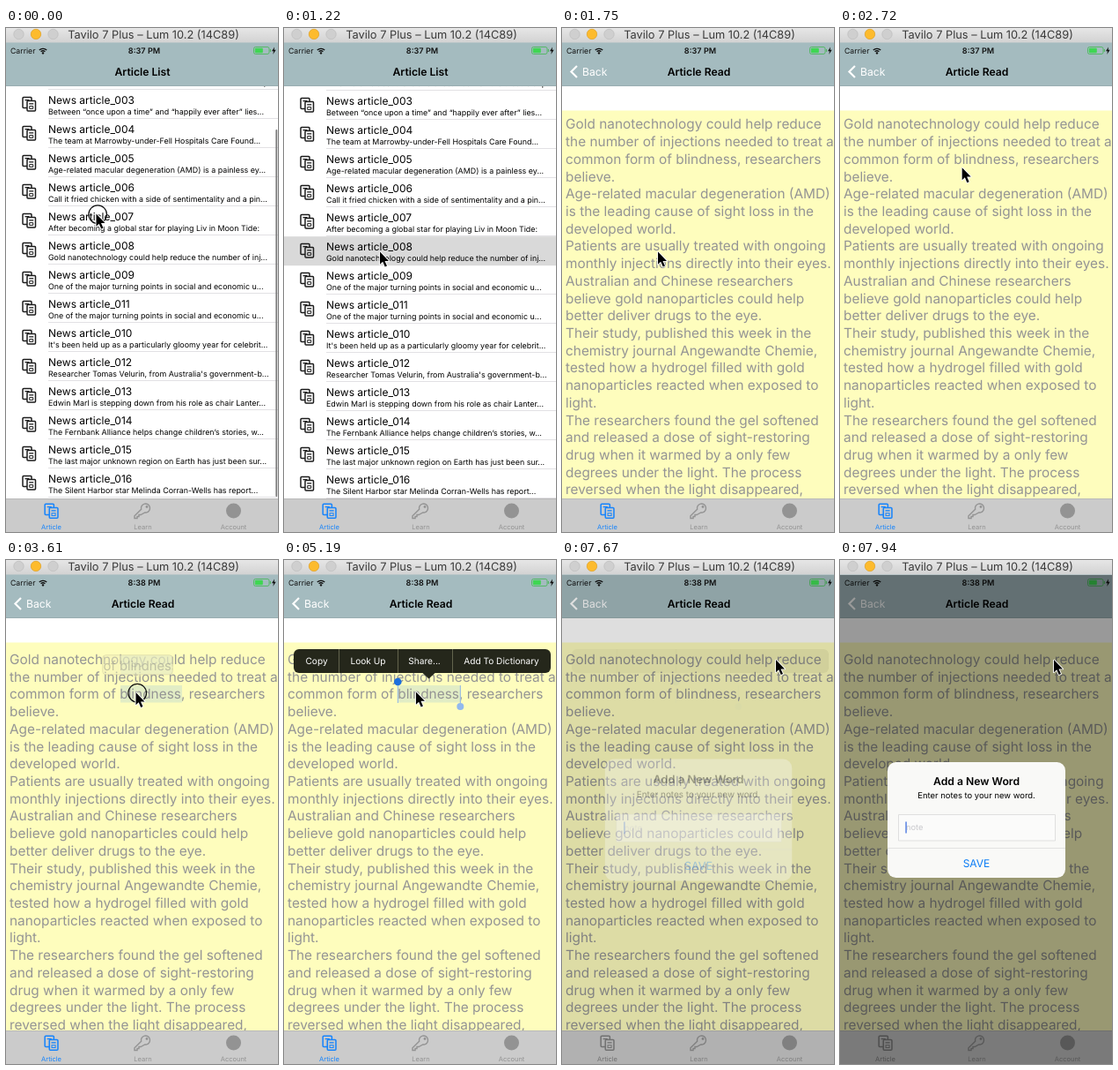
Write an HTML page with a canvas that moves like this. It is 309 px wide and 571 px high and loops after 8 s.

```html
<!DOCTYPE html>
<html lang="en">
<head>
<meta charset="utf-8">
<title>Article reader</title>
<style>
html, body { margin: 0; width: 100%; height: 100%; overflow: hidden; background: #fff; }
canvas { display: block; width: 309px; height: 571px; }
</style>
</head>
<body>
<canvas id="stage"></canvas>
<script>
const W = 309, H = 571, LOOP = 8000, TOP = 66, TAB = 533;
const canvas = document.getElementById('stage');
const ratio = window.devicePixelRatio || 1;
canvas.width = Math.round(W * ratio);
canvas.height = Math.round(H * ratio);
const c = canvas.getContext('2d');

const rows = [
  ['002', 'A new drama about love and a loss has won the theatre cup...'],
  ['003', 'Between “once upon a time” and “happily ever after” lies...'],
  ['004', 'The team at Marrowby-under-Fell Hospitals Care Found...'],
  ['005', 'Age-related macular degeneration (AMD) is a painless ey...'],
  ['006', 'Call it fried chicken with a side of sentimentality and a pin...'],
  ['007', 'After becoming a global star for playing Liv in Moon Tide:'],
  ['008', 'Gold nanotechnology could help reduce the number of inj...'],
  ['009', 'One of the major turning points in social and economic u...'],
  ['011', 'One of the major turning points in social and economic u...'],
  ['010', "It's been held up as a particularly gloomy year for celebrit..."],
  ['012', "Researcher Tomas Velurin, from Australia's government-b..."],
  ['013', 'Edwin Marl is stepping down from his role as chair Lanter...'],
  ['014', 'The Fernbank Alliance helps change children’s stories, w...'],
  ['015', 'The last major unknown region on Earth has just been sur...'],
  ['016', 'The Silent Harbor star Melinda Corran-Wells has report...']
];
const article = `Gold nanotechnology could help reduce
the number of injections needed to treat a
common form of blindness, researchers
believe.
Age-related macular degeneration (AMD)
is the leading cause of sight loss in the
developed world.
Patients are usually treated with ongoing
monthly injections directly into their eyes.
Australian and Chinese researchers
believe gold nanoparticles could help
better deliver drugs to the eye.
Their study, published this week in the
chemistry journal Angewandte Chemie,
tested how a hydrogel filled with gold
nanoparticles reacted when exposed to
light.
The researchers found the gel softened
and released a dose of sight-restoring
drug when it warmed by a only few
degrees under the light. The process
reversed when the light disappeared,`.split('\n');

// Pointer path: time, x, y
const path = [
  [0, 102.5, 210.5], [90, 102.5, 210.5], [610, 111, 275], [700, 111, 275], [870, 109, 253.5],
  [1920, 109, 253.5], [2100, 87, 206], [2200, 87, 206], [2810, 147.5, 150], [5100, 147.5, 150],
  [5190, 150, 149.5], [5280, 144, 146], [5550, 144, 146], [5900, 131, 132], [6250, 155, 113],
  [6350, 155, 113], [6780, 243, 113], [LOOP, 243, 113]
];
const presses = [[0, 180], [1050, 1200], [2980, 4040], [7230, 7310]];

const ramp = (t, a, b) => Math.min(1, Math.max(0, (t - a) / (b - a)));
const easeOut = p => 1 - (1 - p) ** 3;
const mix = (a, b, p) => a + (b - a) * p;
const within = (t, a, b) => t >= a && t < b;

function rect(x, y, w, h, fill) { c.fillStyle = fill; c.fillRect(x, y, w, h); }

function round(x, y, w, h, r, fill, stroke, line = 1) {
  c.beginPath();
  c.roundRect(x, y, w, h, r);
  if (fill) { c.fillStyle = fill; c.fill(); }
  if (stroke) { c.strokeStyle = stroke; c.lineWidth = line; c.stroke(); }
}

function disc(x, y, r, fill) {
  c.beginPath();
  c.arc(x, y, r, 0, 7);
  c.fillStyle = fill;
  c.fill();
}

function poly(points, fill, stroke, line = 1) {
  c.beginPath();
  for (const [x, y] of points) c.lineTo(x, y);
  if (fill) { c.closePath(); c.fillStyle = fill; c.fill(); }
  if (stroke) { c.strokeStyle = stroke; c.lineWidth = line; c.stroke(); }
}

// y is the middle of the lower-case letters plus ascenders
function text(s, x, y, size, fill, align = 'left', weight = 400) {
  c.font = `${weight} ${size}px Inter, sans-serif`;
  c.textAlign = align;
  c.fillStyle = fill;
  c.fillText(s, x, y + size * 0.36);
}

function layer(draw, alpha = 1, dx = 0, dy = 0, scale = 1) {
  if (alpha <= 0) return;
  c.save();
  c.globalAlpha *= alpha;
  c.translate(dx, dy);
  c.scale(scale, scale);
  draw();
  c.restore();
}

function pagesIcon(color, paper) {
  round(-7, -7.5, 10, 12, 1, paper, color, 1.5);
  rect(-4.5, -5, 5, 1.3, color);
  round(-2, -3.5, 9.5, 11.5, 1, paper, color, 1.5);
  rect(0.2, -0.8, 5, 1.3, color);
  round(0.7, 2.6, 4, 2.8, 0, null, color, 1);
}

function keyIcon(color) {
  c.beginPath();
  c.arc(3.5, -3.5, 5, 2.9, 8);
  c.lineTo(-2, 4);
  c.lineTo(-4, 4);
  c.lineTo(-4, 6);
  c.lineTo(-6, 6);
  c.lineTo(-6, 8);
  c.lineTo(-9, 8);
  c.lineTo(-9, 5.2);
  c.closePath();
  c.strokeStyle = color;
  c.lineWidth = 1.4;
  c.stroke();
  disc(5, -5, 1.4, color);
}

function listPage(t) {
  rect(0, TOP, W, TAB - TOP, '#fff');
  const shift = -1 + easeOut(ramp(t, 90, 350));
  rows.forEach(([id, summary], i) => {
    const y = 39 + 33 * i + shift;
    const selected = id === '008' && t >= 1140;
    if (selected) rect(0, y - 0.8, W, 33, '#d9d9d9');
    else rect(48, y + 31.2, W - 48, 0.6, '#cfced2');
    layer(() => pagesIcon('#1c1c1c', selected ? '#d9d9d9' : '#fff'), 1, 26, y + 15);
    text('News article_' + id, 48, y + 10.8, 12, '#000');
    text(summary, 48, y + 24, 8.9, '#000');
  });
  layer(() => round(306.3, 115, 2, 416, 1, '#808080'), 1 - ramp(t, 350, 610));
}

function articleLines(top, color) {
  article.forEach((line, i) => text(line, 4, top + 19.71 * i, 15.4, color));
}

function readPage(t) {
  rect(0, TOP, W, 28, '#fff');
  rect(0, 93.5, W, TAB - 93.5, '#fefdbd');
  if (within(t, 3610, 7580)) round(130, 142, 70, 19.5, 0, 'rgba(150,195,215,.28)');
  articleLines(t < 3610 ? 108.95 : 112.5, '#949494');
}

function pages(t) {
  const p = easeOut(ramp(t, 1270, 1750));
  c.save();
  c.beginPath();
  c.rect(0, TOP, W, TAB - TOP);
  c.clip();
  if (p < 1) {
    layer(() => listPage(t), 1, -0.3 * W * p);
    if (p > 0) rect(0, TOP, W, TAB - TOP, `rgba(0,0,0,${0.1 * p})`);
  }
  if (p > 0) layer(() => readPage(t), 1, W * (1 - p));
  c.restore();
  return p;
}

function statusBar(t) {
  text('Carrier', 5, 26, 8.7, '#111');
  c.strokeStyle = '#111';
  c.lineWidth = 1.3;
  for (const r of [3.4, 6]) {
    c.beginPath();
    c.arc(42, 29.3, r, -2.35, -0.79);
    c.stroke();
  }
  disc(42, 28.4, 1.2, '#111');
  text(t < 3250 ? '8:37 PM' : '8:38 PM', 157, 26, 9.1, '#111', 'center', 600);
  round(281.5, 21.5, 17.5, 8, 2, null, '#45b653', 0.8);
  round(282.8, 22.8, 9, 5.4, 1, '#3fd653');
  rect(299.8, 24, 1, 3, '#45b653');
  poly([[305, 21.5], [302, 26.2], [304, 26.2], [303.3, 30], [306.6, 24.8], [304.6, 24.8]], '#111');
}

function navBar(t, p) {
  rect(0, 16, W, TOP - 16, '#a4bbbf');
  rect(0, TOP - 0.6, W, 0.6, '#93a5a8');
  statusBar(t);
  layer(() => text('Article List', 155, 49.5, 12.2, '#000', 'center', 600), 1 - p * 1.4, -115 * p);
  layer(() => text('Article Read', 155.5, 49.5, 12.2, '#000', 'center', 600), p, 140 * (1 - p));
  layer(() => {
    poly([[17, 43], [10.5, 49.5], [17, 56]], null, '#fff', 2.2);
    text('Back', 23, 49.5, 12.2, '#fff');
  }, p);
}

function tabBar(dimmed) {
  const gray = '#939393', active = dimmed ? '#828282' : '#1784fb';
  rect(0, TAB, W, H - TAB, '#cbcbcb');
  rect(0, TAB, W, 0.7, '#b2b2b2');
  layer(() => pagesIcon(active, '#cbcbcb'), 1, 51.3, 547, 1.02);
  layer(() => keyIcon(gray), 1, 155, 547.5);
  disc(258.5, 547, 8.5, gray);
  text('Article', 51.5, 565, 7.5, active, 'center');
  text('Learn', 155.5, 565, 7.5, gray, 'center');
  text('Account', 258.5, 565, 7.5, gray, 'center');
}

function titleBar() {
  const g = c.createLinearGradient(0, 0, 0, 16);
  g.addColorStop(0, '#e6e6e6');
  g.addColorStop(1, '#d3d3d3');
  rect(0, 0, W, 16.5, g);
  for (const [x, fill, edge] of [[14.5, '#cfcfcf', '#bcbcbc'], [34, '#fdbb2d', '#dfa023'], [53.5, '#cfcfcf', '#bcbcbc']])
    round(x - 5.7, 1.3, 11.4, 11.4, 5.7, fill, edge, 0.7);
  text('Tavilo 7 Plus – Lum 10.2 (14C89)', 167.5, 7.2, 12.8, '#3a3a3a', 'center');
}

function loupe() {
  c.beginPath();
  c.roundRect(-54, -16, 108, 30, 5);
  c.fillStyle = '#f1efb8';
  c.fill();
  c.save();
  c.clip();
  rect(-26, -16, 90, 30, '#dfe8c4');
  text('of blindness', -53, 0, 20, '#8c8c84');
  c.restore();
  round(-54, -16, 108, 30, 5, null, '#b9b893', 1);
  poly([[-7, 14], [7, 14], [0, 21]], '#f1efb8');
}

function handles() {
  rect(128.8, 142, 1.2, 20, '#9fbfe0');
  rect(199.8, 142, 1.2, 20, '#9fbfe0');
  disc(129.3, 138, 4.3, '#1c6fdd');
  disc(200.3, 166, 4, '#92b9ee');
}

function menu(pressed) {
  round(11, 101, 292, 27, 6, '#25271b');
  poly([[157.5, 128], [171.5, 128], [164.5, 134.5]], '#25271b');
  if (pressed) round(191, 101, 112, 27, [0, 6, 6, 0], '#8e8f60');
  for (const x of [62, 129, 191]) rect(x, 101, 0.8, 27, '#73755a');
  [['Copy', 37], ['Look Up', 95.5], ['Share...', 159.5], ['Add To Dictionary', 247]]
    .forEach(([label, x]) => text(label, x, 114.5, 10.15, '#fff', 'center'));
}

function alertBox() {
  round(-101, -65.5, 202, 131, 9.5, '#f9f9f7');
  text('Add a New Word', 0, -43.5, 12.2, '#000', 'center', 600);
  text('Enter notes to your new word.', 0, -27.5, 9.45, '#000', 'center');
  round(-88.5, -6, 178, 29.5, 0, '#fbfbfa', '#d9d9d9', 0.8);
  text('note', -80, 8.5, 9.3, '#c9c9cd');
  rect(-80.6, 2, 1.3, 13, '#3f6fe0');
  rect(-101, 31.5, 202, 0.7, '#d8d8d8');
  text('SAVE', 0, 49.3, 12, '#0b7cf5', 'center');
}

function pointer(t) {
  const i = Math.max(1, path.findIndex(k => k[0] > t));
  const a = path[i - 1], b = path[i], p = ramp(t, a[0], b[0]);
  const x = mix(a[1], b[1], p), y = mix(a[2], b[2], p);
  layer(() => {
    if (presses.some(([from, to]) => within(t, from, to))) {
      c.beginPath();
      c.arc(1.7, 0.7, 10.3, 0, 7);
      c.strokeStyle = '#111';
      c.lineWidth = 1.2;
      c.stroke();
    }
    c.lineJoin = 'round';
    const arrow = [[0, 0], [0, 14.2], [3.2, 11.2], [5.7, 17], [8, 16], [5.5, 10.4], [10, 10.4], [0, 0]];
    poly(arrow, null, '#fff', 1.8);
    poly(arrow, '#000');
  }, 1, x, y);
}

function render(t) {
  c.setTransform(ratio, 0, 0, ratio, 0, 0);
  c.textRendering = 'geometricPrecision';
  const dim = ramp(t, 7560, 7900);
  const p = pages(t);
  navBar(t, p);
  tabBar(dim > 0);

  const zoom = ramp(t, 3540, 3690) * (1 - ramp(t, 3950, 4120));
  if (t >= 3610) layer(loupe, zoom, 149.5, 119.5, 0.5 + 0.5 * zoom);

  const shown = ramp(t, 4000, 4210) * (1 - ramp(t, 7480, 7680));
  layer(() => { menu(t >= 7230); handles(); }, shown);

  if (dim > 0) {
    rect(0, 17, W, H - 17, `rgba(0,0,0,${0.4 * dim})`);
    layer(alertBox, dim, 155, 294.5, 1.17 - 0.17 * easeOut(dim));
  }
  titleBar();
  pointer(t);
}

function loop(now) {
  render(now % LOOP);
  requestAnimationFrame(loop);
}
requestAnimationFrame(loop);
</script>
</body>
</html>
```
